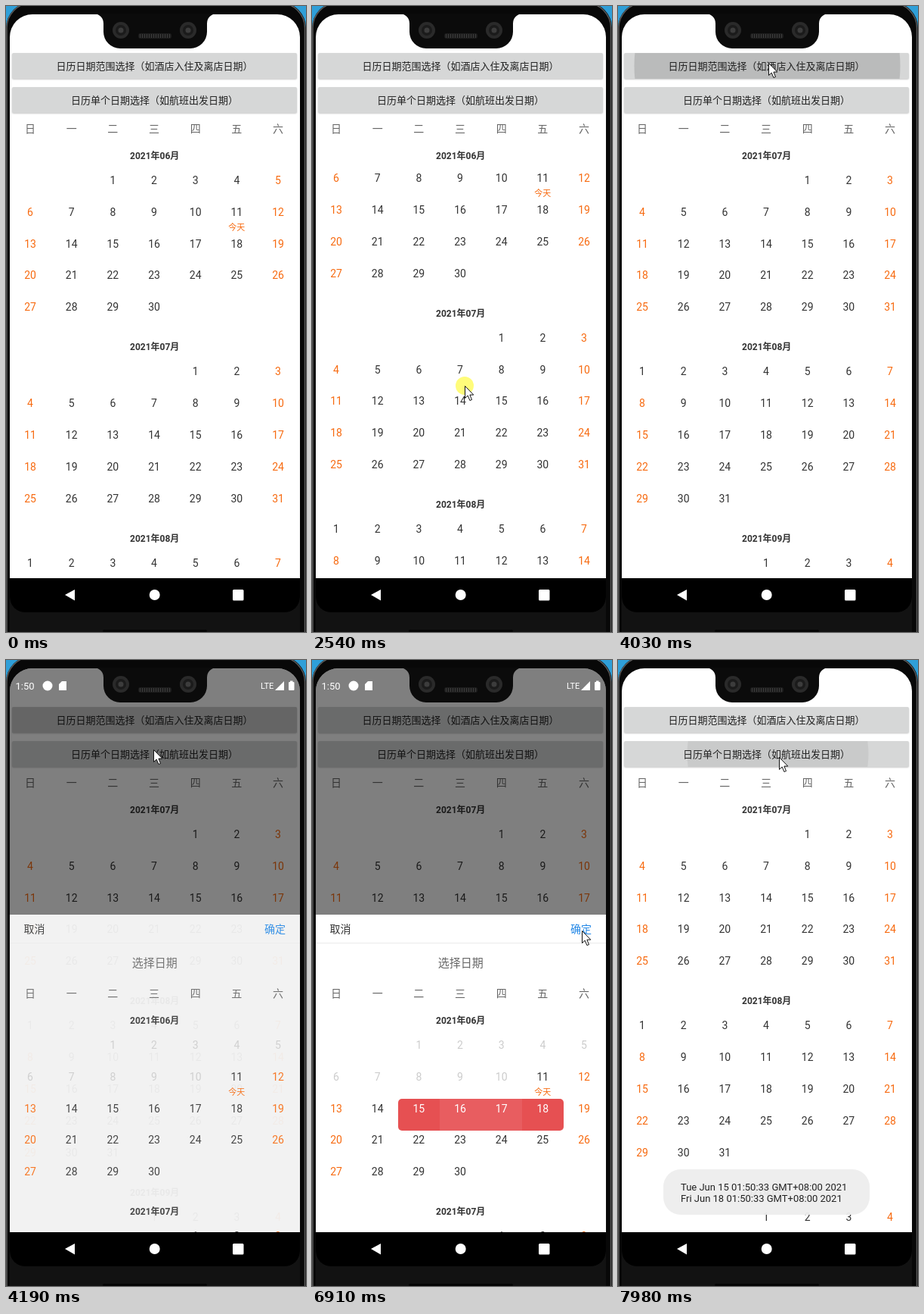
Animation of 397 by 826 pixels, one loop 8000 ms. Source, as an HTML page with a canvas:

```html
<!DOCTYPE html>
<html lang="zh-CN">
<head>
<meta charset="utf-8">
<title>日历</title>
<style>
html, body { margin: 0; width: 100%; height: 100%; overflow: hidden; background: #111 }
canvas { display: block }
</style>
</head>
<body>
<canvas id="stage" width="397" height="826"></canvas>
<script>
const c = document.getElementById('stage').getContext('2d');
const FONT = 'Roboto, "Noto Sans CJK SC", "Noto Sans CJK", sans-serif';
const INK = '#333', GREY = '#666', ORANGE = '#f76a10', BLUE = '#2287e6';
const LOOP = 8000, STEP = 77.5;
const COL = 54.67, ROW = 41.8, HEAD = 43.4, MONTH = HEAD + 5 * ROW;
const LIST_TOP = 174.1, SHEET_SHIFT = 278;
const CLICKS = [50, 62, 72, 87, 101];

const ramp = (k, a, b) => Math.min(1, Math.max(0, (k - a) / (b - a)));
const smooth = s => s * s * (3 - 2 * s);
const easeIn = s => s * s;
const easeOut = s => 1 - (1 - s) ** 2;
const linear = s => s;

// Each glide goes on from the end of the one before; bow bends it sideways.
const GLIDES = [
  { from: 2, to: 14, x: 179, y: 386, bow: -60, ease: linear },
  { from: 16, to: 26, x: 231, y: 546 },
  { from: 28, to: 38, x: 242, y: 365, bow: -32, ease: easeIn },
  { from: 39, to: 49, x: 199, y: 75 },
  { from: 52.5, to: 61, x: 146, y: 602 },
  { from: 64, to: 70.5, x: 279, y: 614 },
  { from: 75, to: 86, x: 357, y: 357 },
  { from: 89.5, to: 99, x: 213, y: 128, bow: 75 }
];

function pointerAt(k) {
  let x = 346, y = 814;
  for (const g of GLIDES) {
    const s = ramp(k, g.from, g.to), e = (g.ease || smooth)(s);
    x += (g.x - x) * e + (g.bow || 0) * Math.sin(Math.PI * s);
    y += (g.y - y) * e;
    if (s < 1) break;
  }
  return [Math.round(x), Math.round(y)];
}

function box(x, y, w, h, r, fill) {
  c.beginPath();
  c.roundRect(x, y, w, h, r);
  c.fillStyle = fill;
  c.fill();
}

function disc(x, y, r, fill) {
  c.beginPath();
  c.arc(x, y, r, 0, 7);
  c.fillStyle = fill;
  c.fill();
}

function poly(points, fill) {
  c.beginPath();
  points.forEach(p => c.lineTo(...p));
  c.closePath();
  c.fillStyle = fill;
  c.fill();
}

// y is the middle of the line
function text(s, x, y, size, color, align = 'center', weight = 400) {
  c.font = `${weight} ${size}px ${FONT}`;
  c.textAlign = align;
  c.fillStyle = color;
  c.fillText(s, x, Math.round(y + size * .36));
}

const colX = i => 32 + COL * i;

function weekdays(y) {
  [...'日一二三四五六'].forEach((d, i) => text(d, colX(i), y, 14, GREY));
}

function monthHead(m, y) {
  text(`2021年0${m + 6}月`, 196.7, y + 23.4, 12, INK, 'center', 700);
}

function dayColor(m, d, col, picker, picked) {
  if (picked) return '#fff';
  if (picker && !m && d < 11) return '#ccc';
  return col == 6 || (col == 0 && d > 1) ? ORANGE : INK;
}

function pickedCell(x, y, d) {
  const left = Math.round(x - COL / 2), right = Math.round(x + COL / 2);
  const l = d == 15 ? 5 : 0, r = d == 18 ? 5 : 0;
  box(left, Math.round(y), right - left, 42, [l, r, r, l], l || r ? '#e65052' : '#e85d60');
}

function month(m, y0, picker, last) {
  const first = new Date(2021, m + 5, 1).getDay();
  const count = new Date(2021, m + 6, 0).getDate();
  for (let d = 1; d <= count; d++) {
    const n = first + d - 1, col = n % 7, x = colX(col);
    const y = y0 + HEAD + Math.floor(n / 7) * ROW;
    const picked = picker && !m && d >= 15 && d <= last;
    if (picked) pickedCell(x, y, d);
    text(d, x, y + 12.5, 14, dayColor(m, d, col, picker, picked));
    if (!m && d == 11) text('今天', x, y + 32.3, 11, ORANGE);
  }
}

function calendar(top, scroll, picker, last) {
  c.save();
  c.beginPath();
  c.rect(5, top, 384, 755 - top);
  c.clip();
  const current = Math.floor((scroll + .5) / MONTH);
  for (let m = current; m < current + 3; m++) {
    const y = top + m * MONTH - scroll;
    month(m, y, picker, last);
    if (m > current) monthHead(m, y);
  }
  // the current heading sticks until the next one pushes it out
  const y = Math.min(top, top + (current + 1) * MONTH - scroll - HEAD);
  if (!picker) box(5, y, 384, HEAD, 0, '#fff');
  monthHead(current, y);
  c.restore();
}

function button(label, y, x, age) {
  c.save();
  c.shadowColor = 'rgba(0,0,0,.22)';
  c.shadowBlur = 2;
  c.shadowOffsetY = 1;
  box(8, y, 377, 34, 2, '#d6d7d7');
  c.restore();
  const alpha = Math.min(.027 * age * age, .218 - .04 * age);
  if (age > 0 && alpha > 0) {
    c.save();
    c.beginPath();
    c.rect(8, y, 377, 34);
    c.clip();
    disc(x, y + 17, 80 * age, `rgba(0,0,0,${alpha})`);
    c.restore();
  }
  text(label, 196.5, y + 17, 13, '#222');
}

function body() {
  box(0, 0, 397, 826, 0, '#2f9fd8');
  box(0, -5, 397, 900, 34, '#080808');
  c.beginPath();
  c.roundRect(1, -4, 394.5, 900, 33);
  c.lineWidth = 1.5;
  c.strokeStyle = '#5c5c5c';
  c.stroke();
  box(5, 780, 384, 46, 0, '#121212');
  box(128, 823, 138, 3, 2, '#050505');
}

function notch() {
  c.beginPath();
  c.moveTo(116, 10);
  c.arcTo(129, 10, 129, 24, 13);
  c.arcTo(129, 56, 160, 56, 22);
  c.arcTo(266, 56, 266, 30, 22);
  c.arcTo(266, 10, 279, 10, 13);
  c.lineTo(279, 10);
  c.fillStyle = '#0b0b0b';
  c.fill();
  for (const x of [152, 241]) {
    disc(x, 32, 11, '#2a2a2a');
    disc(x, 32, 7, '#1b1b1b');
    disc(x, 32, 3.5, '#3c3c3c');
  }
  box(175, 36, 44, 7, 3, '#1d1d1d');
  for (let x = 177; x < 218; x += 3) box(x, 37, 1, 5, 0, '#3c3c3c');
}

function statusBar() {
  text('1:50', 12.5, 34, 13, '#fff', 'left');
  disc(55, 34, 6.5, '#fff');
  poly([[74, 28], [80, 28], [80, 40], [70, 40], [70, 32]], '#fff');
  text('LTE', 337, 34, 11, '#fff', 'left');
  poly([[368, 28], [368, 40], [356, 40]], '#fff');
  box(374, 29, 7.5, 11, 1, '#fff');
  box(376, 27.5, 3.5, 2, 0, '#fff');
}

function navBar() {
  box(5, 755, 384, 45, [0, 0, 20, 20], '#000');
  poly([[78, 777], [91, 770], [91, 784.5]], '#fff');
  disc(196.7, 777, 7, '#fff');
  box(300, 770, 14.5, 14.5, 1.5, '#fff');
}

function dialog(alpha, k) {
  if (!alpha) return;
  c.save();
  c.globalAlpha = Math.min(1, alpha * 1.2);
  box(5, 11, 384, 744, 0, 'rgba(0,0,0,.5)');
  c.globalAlpha = alpha;
  box(5, 336, 384, 419, 0, '#fff');
  box(5, 373, 384, 1, 0, '#ebebeb');
  text('取消', 23.5, 355, 14, INK, 'left');
  text('确定', 370, 355, 14, BLUE, 'right');
  text('选择日期', 196.7, 399.4, 15, GREY);
  weekdays(161.5 + SHEET_SHIFT);
  calendar(LIST_TOP + SHEET_SHIFT, 0, true, k >= 74 ? 18 : k >= 64 ? 15 : 0);
  c.restore();
}

function toast(alpha) {
  c.save();
  c.globalAlpha = alpha;
  box(60, 672, 273, 60, 23, 'rgba(238,238,238,.95)');
  text('Tue Jun 15 01:50:33 GMT+08:00 2021', 83, 695, 13, '#222', 'left');
  text('Fri Jun 18 01:50:33 GMT+08:00 2021', 83, 710, 13, '#222', 'left');
  c.restore();
}

function pointer(k) {
  if (k < 2) return;
  const [x, y] = pointerAt(k);
  const dragging = k >= 28 && k <= 36;
  if (dragging || CLICKS.some(p => k == p || k == p + 1)) disc(x, y, 12, 'rgba(255,250,0,.52)');
  c.save();
  c.translate(x + .5, y + .5);
  poly([[0, 0], [0, 16], [3.7, 12.6], [6.4, 19], [9, 18], [6.4, 11.6], [11.3, 11.6]], '#fff');
  c.lineWidth = 1;
  c.strokeStyle = '#111';
  c.stroke();
  c.restore();
}

function draw(k) {
  body();
  c.save();
  c.beginPath();
  c.roundRect(5, 11, 384, 789, [30, 30, 20, 20]);
  c.clip();
  box(5, 11, 384, 744, 0, '#fff');
  button('日历日期范围选择（如酒店入住及离店日期）', 62, 197.5, k - 49.8);
  button('日历单个日期选择（如航班出发日期）', 107, 211.5, k - 101.5);
  weekdays(161.5);
  calendar(LIST_TOP, MONTH * ramp(k, 28, 38) ** 2.5);
  dialog(easeOut(ramp(k, 52, 54.9)) * (1 - ramp(k, 89, 92)), k);
  statusBar();
  toast(ramp(k, 91, 94));
  navBar();
  c.restore();
  notch();
  pointer(k);
}

function tick() {
  draw(Math.floor((performance.now() % LOOP + 18) / STEP));
  requestAnimationFrame(tick);
}
tick();
</script>
</body>
</html>
```
